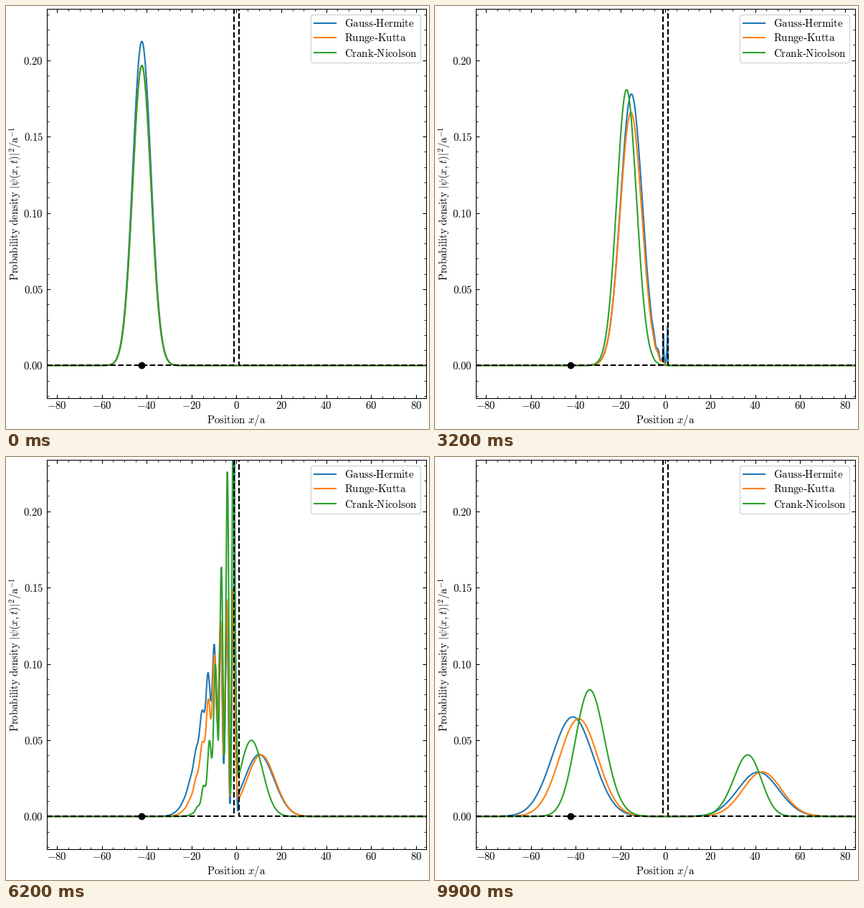
Recreate the animation shown at these times as a matplotlib script. Size 590x590 px, loop 10 s.

```python
import numpy as np
import matplotlib.pyplot as plt
from matplotlib.animation import FuncAnimation
from matplotlib.ticker import FuncFormatter, MultipleLocator

plt.rcParams.update({
    "font.family": "Liberation Serif",
    "font.size": 10.7,
    "mathtext.fontset": "cm",
    "xtick.direction": "in", "ytick.direction": "in",
    "xtick.top": True, "ytick.right": True,
    "xtick.major.pad": 2.8, "xtick.minor.pad": 2.8,
})

SIZE, DPI = 590, 100
FRAMES = 100
LEFT, RIGHT, TOP, BOTTOM = 57.15, 585.83, 4.17, 546.6   # axes edges in pixels

# Lengths in units of the barrier half width, time in frames
HALF = 84.5
START = -42.2
SPEED = 0.844
K0 = 1.258
VAR = 16.47                 # initial variance of the density
BARRIER = 1.721             # squared wave number of the barrier top
HBAR_M = SPEED / K0
PEAK_ANALYTIC, PEAK_GRID = 0.2124, 0.1966

x = np.linspace(-HALF, HALF, 1000)
dx = x[1] - x[0]
steps = np.arange(FRAMES)


def grid_solutions():
    """Densities on the grid: exact stepping and one implicit step per frame."""
    wall = np.where(np.abs(x) <= 1, BARRIER, 0)
    side = np.full(len(x) - 1, -1 / dx**2)
    ham = np.diag(2 / dx**2 + wall) + np.diag(side, 1) + np.diag(side, -1)
    energy, modes = np.linalg.eigh(HBAR_M / 2 * ham)
    psi = np.exp(-(x - START)**2 / (4 * VAR) + 1j * K0 * x)
    coef = modes.T @ psi

    def evolve(freq):
        waves = modes @ (coef[:, None] * np.exp(-1j * np.outer(freq, steps)))
        return PEAK_GRID * np.abs(waves.T)**2

    return evolve(energy), evolve(2 * np.arctan(energy / 2))


def packet(offset, width):
    return np.sqrt(VAR / width) * np.exp(-offset**2 / (4 * width))


def analytic_solution():
    """Gaussian packets weighted with the scattering amplitudes at K0."""
    kappa = np.sqrt(BARRIER - K0**2)
    slope, bend = K0 / kappa, 8.0
    grow, decay = (1 + 1j * slope) / 2, (1 - 1j * slope) / 2
    a, b = grow * np.exp(-2 * kappa), decay * np.exp(2 * kappa)
    value, deriv = a + b, kappa * (a - b) / (1j * K0)
    phase = np.exp(1j * K0)
    incoming = (value + deriv) / 2 * phase
    refl = (value - deriv) / 2 / phase / incoming
    trans = 1 / phase / incoming
    grow = grow * np.exp(-kappa) / incoming
    decay = decay * np.exp(kappa) / incoming

    left, right = x < -1, x > 1
    mid = ~(left | right)
    xl, xm, xr = x[left], x[mid], x[right]
    out = np.empty((FRAMES, len(x)))
    for n in steps:
        center = START + SPEED * n
        width = VAR + 0.5j * HBAR_M * n
        psi = np.empty(len(x), complex)
        psi[left] = (np.exp(1j * K0 * xl) * packet(xl - center, width)
                     + refl * np.exp(-1j * K0 * xl) * packet(-xl - center, width))
        psi[mid] = sum(
            amp * np.exp(s * kappa * xm)
            * packet(-center + 1j * s * slope * xm, width + s * bend * xm)
            for s, amp in ((1, grow), (-1, decay)))
        psi[right] = trans * packet(xr - center, width)
        out[n] = PEAK_ANALYTIC * np.abs(psi)**2
    return out


exact, implicit = grid_solutions()
curves = [
    ("$\\mathrm{Gauss}$\u2010$\\mathrm{Hermite}$", "tab:blue", analytic_solution()),
    ("$\\mathrm{Runge}$\u2010$\\mathrm{Kutta}$", "tab:orange", exact),
    ("$\\mathrm{Crank}$\u2010$\\mathrm{Nicolson}$", "tab:green", implicit),
]

fig = plt.figure(figsize=(SIZE / DPI, SIZE / DPI), dpi=DPI)
ax = fig.add_axes([LEFT / SIZE, 1 - BOTTOM / SIZE,
                   (RIGHT - LEFT) / SIZE, (BOTTOM - TOP) / SIZE])
ax.set_xlim(-HALF, HALF)
ax.set_ylim(-0.1 * PEAK_ANALYTIC, 1.1 * PEAK_ANALYTIC)

for axis, major, minor, fmt in ((ax.xaxis, 20, 5, ".0f"), (ax.yaxis, 0.05, 0.01, ".2f")):
    axis.set_major_locator(MultipleLocator(major))
    axis.set_minor_locator(MultipleLocator(minor))
    axis.set_major_formatter(
        FuncFormatter(lambda v, _, fmt=fmt: f"${round(v, 4) + 0.0:{fmt}}$"))

fig.text((LEFT + RIGHT) / 2 / SIZE, 8.4 / SIZE, r"$\mathrm{Position}\ x/\mathrm{a}$",
         ha="center", va="baseline")
fig.text(17.3 / SIZE, 1 - (TOP + BOTTOM) / 2 / SIZE,
         r"$\mathrm{Probability}\ \mathrm{density}\ |\psi(x,t)|^2/\mathrm{a}^{-1}$",
         ha="center", va="baseline", rotation=90, rotation_mode="anchor")

lines = [ax.plot(x, data[0], color=color, lw=1.5, label=label)[0]
         for label, color, data in curves]
ax.plot([-HALF, -1, -1, 1, 1, HALF], [0, 0, BARRIER, BARRIER, 0, 0],
        "k--", lw=1.5, zorder=3)
ax.plot(START, 0, "ko", ms=6, zorder=4)
ax.legend(loc="upper right", labelspacing=0.295, borderpad=0.35).set_zorder(5)


def update(n):
    for line, (_, _, data) in zip(lines, curves):
        line.set_ydata(data[n])
    return lines


anim = FuncAnimation(fig, update, frames=FRAMES, interval=100,
                     repeat=True, repeat_delay=0)
plt.show()
```
